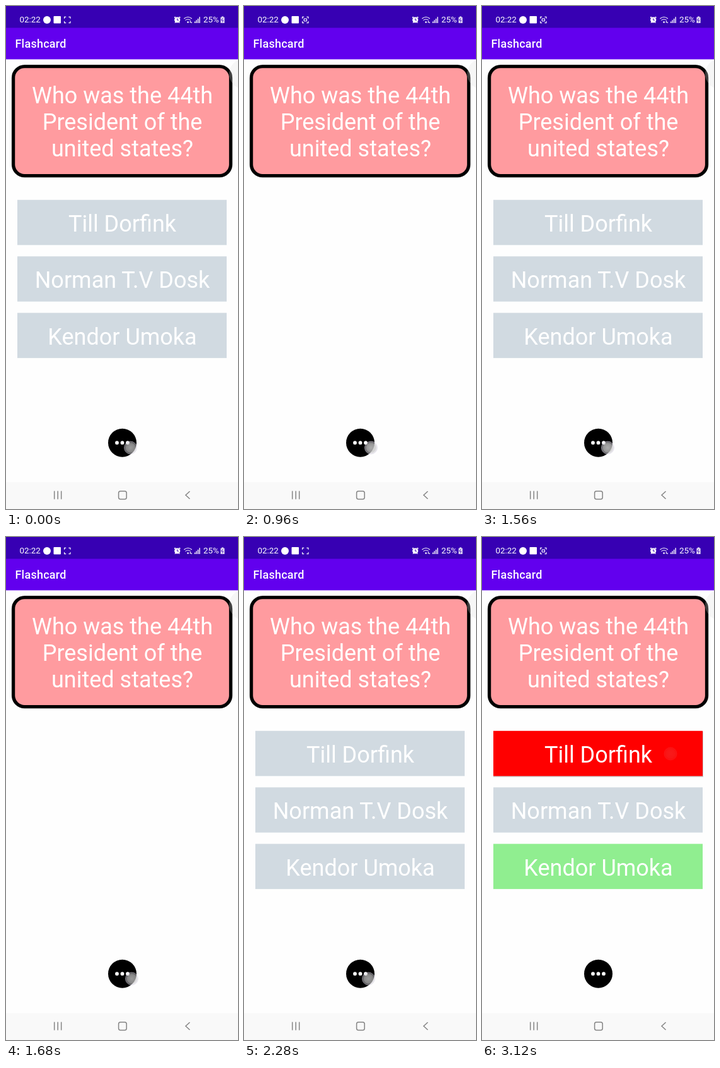
Recreate the animation shown at these times as an HTML page. Size 368 by 796 pixels, loop 3240 ms.

```html
<!DOCTYPE html>
<html lang="en">
<head>
<meta charset="utf-8">
<title>Flashcard</title>
<style>
  html, body { margin: 0; width: 100%; height: 100%; overflow: hidden; background: #fefefe; }
  svg { display: block; width: 100%; height: 100%; }
  text { font-family: Roboto, sans-serif; fill: #fff; }
  .big { font-size: 36px; text-anchor: middle; }
  .status { font-size: 13.4px; }
  .title { font-size: 18px; font-weight: 500; letter-spacing: .22px; }
  .line { fill: none; stroke: #fff; stroke-width: 1.1; }
  .nav { fill: none; stroke: #858585; stroke-width: 1.5; }
</style>
</head>
<body>
<svg viewBox="0 0 368 796">
  <defs>
    <radialGradient id="glow">
      <stop offset="0" stop-color="#cbcbcb" stop-opacity=".85"/>
      <stop offset=".7" stop-color="#c6c6c6" stop-opacity=".75"/>
      <stop offset="1" stop-color="#d4d0dc" stop-opacity=".35"/>
    </radialGradient>
  </defs>

  <rect width="368" height="84.4" fill="#6200ee"/>
  <rect width="368" height="34.5" fill="#3700b3"/>
  <text class="title" x="14.5" y="66">Flashcard</text>

  <!-- status bar -->
  <text class="status" x="21.5" y="26.3">02:22</text>
  <circle cx="65" cy="22" r="6" fill="#fff"/>
  <rect x="75.5" y="16" width="11.5" height="11.5" rx="1" fill="#fff"/>
  <path class="line" d="M92.6 20v-2.6h2.6M99.4 17.4h2.6V20M102 24v2.6h-2.6M95.2 26.6h-2.6V24"/>
  <rect id="scan" class="line" x="95.2" y="20.2" width="4.2" height="3.6"/>
  <g fill="#fff">
    <circle cx="271.7" cy="22" r="4.6"/>
    <path d="M267 19.5v-2.4h3zM276.4 19.5v-2.4h-3zM267.3 27l1.5-2.5 2 1.5zM276.1 27l-1.5-2.5-2 1.5z"/>
    <path d="M271.7 19.5v2.8h2.2" fill="none" stroke="#3700b3"/>
    <circle cx="288.6" cy="25.6" r="1.3"/>
    <path class="line" d="M282.4 20q6.2-5 12.4 0M284.4 22.6q4.2-3.2 8.4 0"/>
    <path d="M292.5 23.5l1.5 2.2h-3zM294 27.3l-1.5-1.5h3z"/>
    <path d="M299 24.5h1.4V27H299zM301.4 22.3h1.4V27h-1.4zM303.9 20h1.4v7h-1.4zM306.4 17.3h1.4V27h-1.4z"/>
    <path d="M342 16.6h3v1.2h1.6V27h-6.2v-9.2h1.6z" opacity=".85"/>
  </g>
  <path d="M344 19l-2.5 3.5h3L343 26" fill="none" stroke="#3700b3" stroke-width=".8"/>
  <text class="status" x="313" y="26.3">25%</text>

  <!-- question -->
  <rect x="11.6" y="95.7" width="344.9" height="173" rx="18" fill="#ff9b9f" stroke="#000" stroke-width="5.3"/>
  <g class="big">
    <text x="184.5" y="154">Who was the 44th</text>
    <text x="184.5" y="196">President of the</text>
    <text x="184.5" y="238">united states?</text>
  </g>
  <circle cx="378" cy="107.5" r="24" fill="#dedede" fill-opacity=".28"/>

  <g id="answers"></g>

  <!-- menu button -->
  <circle cx="184.5" cy="691.2" r="22.5"/>
  <path d="M176 691.2h17.1" stroke="#fff" stroke-width="5.8" stroke-linecap="round" stroke-dasharray="0 8.5"/>

  <!-- navigation bar -->
  <rect y="753.5" width="368" height="42.5" fill="#f9f9f9"/>
  <path class="nav" d="M76.7 767.5v13M82.2 767.5v13M87.7 767.5v13M291.5 768l-6.5 6 6.5 6"/>
  <rect class="nav" x="178.6" y="767.8" width="12.6" height="12.6" rx="3"/>

  <circle id="touch" r="10" fill="url(#glow)" stroke="#dcd8e6" stroke-opacity=".6"/>
</svg>
<script>
const LOOP = 3240, STEP = 120, BLINK = 540;
const GREY = '#d1dae1';
const answers = [
  { name: 'Till Dorfink', result: 'red' },
  { name: 'Norman T.V Dosk', result: GREY },
  { name: 'Kendor Umoka', result: 'lightgreen' }
];
const menuTaps = [0, 600, 1080, 1680, 2280]; // release times in ms
const answerTap = 3000;

const $ = id => document.getElementById(id);
const show = (el, on) => el.style.display = on ? '' : 'none';

$('answers').innerHTML = answers.map(({ name }, i) => {
  const y = 306.8 + i * 89.4;
  return `<rect class="shade" x="18" y="${y + 1}" width="333" height="72" opacity="0"/>
    <rect class="fill" x="18" y="${y}" width="332" height="71.5"/>
    <text class="big" x="184.5" y="${y + 50.2}">${name}</text>`;
}).join('');
const fills = document.querySelectorAll('.fill');
const shade = document.querySelector('.shade');

// A finger shows one step before its release, then fades out.
function touchOpacity(age) {
  return age < -STEP ? 0 : Math.max(0, Math.min(1, .9 - age / 160));
}

function drawTouch(t) {
  const tap = [...menuTaps, answerTap].findLast(time => time - STEP <= t);
  const [x, y] = tap === answerTap ? [299, 343] : [199.5 + 2 * Math.sin(tap / 360 - 1.5), 699];
  $('touch').setAttribute('transform', `translate(${x} ${y})`);
  $('touch').setAttribute('opacity', touchOpacity(t - tap));
}

function draw(now) {
  const t = Math.floor(now % LOOP / STEP) * STEP;
  const done = t >= answerTap;

  // Every tap on the menu button toggles the answers.
  show($('answers'), menuTaps.filter(time => time <= t).length % 2);
  show($('scan'), t % BLINK > 200);
  fills.forEach((el, i) => el.setAttribute('fill', done ? answers[i].result : GREY));
  shade.setAttribute('opacity', done ? .2 : 0);
  drawTouch(t);
}

const start = performance.now();
function tick() {
  draw(performance.now() - start);
  requestAnimationFrame(tick);
}
tick();
</script>
</body>
</html>
```
